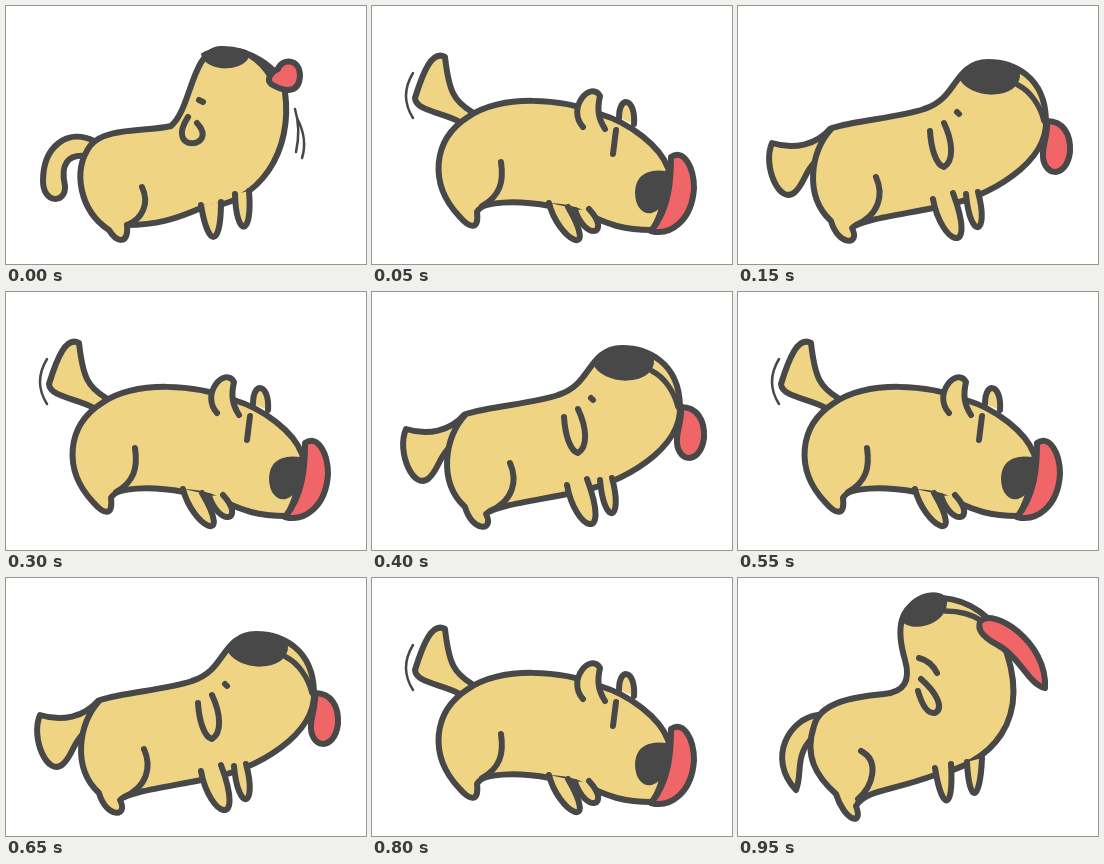
These frames come from a looping animation (360 by 258 pixels, 1000 ms). An HTML page with a canvas:

```html
<!DOCTYPE html>
<html lang="en">
<head>
<meta charset="utf-8">
<title>Wagging dog</title>
<style>
  html, body { margin: 0; width: 100%; height: 100%; overflow: hidden; background: #fff; }
  canvas { display: block; }
</style>
</head>
<body>
<canvas id="stage" width="360" height="258"></canvas>
<script>
const ctx = document.getElementById('stage').getContext('2d');
const STEP = 50;
const INK = '#484848', FUR = '#efd583', RED = '#f06668';

// Parts from back to front: name, fill, line width.
const parts = [
  ['tail', FUR, 6], ['farEar', FUR, 6], ['body', FUR, 6],
  ['farLeg', FUR, 6], ['nearLeg', FUR, 6], ['hind', null, 6],
  ['ear', FUR, 6], ['eye', null, 6], ['nose', INK, 2],
  ['mouth', null, 5.5], ['tongue', RED, 6], ['swish', null, 2.5]
];

// Body order: back, rump, foot, belly, chest, muzzle, nape.
const up = {
  tail: 'M88 135C62 122 37 140 37 175C37 198 60 198 59 180C54 158 62 148 80 150',
  body: `M165 120C140 126 98 121 84 140C66 165 74 205 103 224C110 236 123 240 121 219
    C150 219 170 213 195 202C255 198 287 145 279 86C274 60 240 42 215 43C185 44 186 102 165 120Z`,
  farLeg: 'M229 188C230 232 247 232 243 185',
  nearLeg: 'M195 199C202 242 215 242 215 196',
  hind: 'M136 181C144 198 136 213 121 219',
  ear: 'M182 111C158 148 214 142 191 117',
  eye: 'M193 94L197 96',
  nose: 'M196 48C205 41 236 41 243 47C241 66 200 66 196 48Z',
  mouth: 'M243 49C251 54 260 62 265 72',
  tongue: 'M272 63C276 52 294 52 294 70C293 88 278 86 265 78C260 73 265 66 272 63Z',
  swish: 'M289 103Q295 123 290 146M291 112Q302 133 296 152'
};

const down = {
  tail: 'M100 106C82 95 77 86 73 51C60 44 51 66 43 92C44 105 70 106 88 116',
  farEar: 'M247 112C247 88 264 92 262 118',
  body: `M228 108C190 92 130 88 96 111C60 134 57 178 87 210C100 225 107 222 105 206
    C110 195 145 194 178 200C222 202 225 224 280 224C299 212 303 180 296 162C288 140 258 117 228 108Z`,
  farLeg: 'M203 204C214 236 240 228 217 203',
  nearLeg: 'M177 197C186 234 228 256 196 201',
  hind: 'M129 156C132 176 128 190 110 200',
  ear: 'M211 121C194 102 219 74 228 90C225 103 226 112 233 123',
  eye: 'M244 124L241 148',
  nose: 'M264 186C265 164 285 164 297 167C296 215 264 216 264 186Z',
  mouth: 'M296 166C298 180 290 205 281 224',
  tongue: 'M299 151C312 142 322 162 322 182C320 215 298 230 279 225C297 203 299 175 299 151Z',
  swish: 'M41 67Q27 90 41 112'
};

const level = {
  tail: 'M92 123C78 139 56 144 34 137C24 160 42 200 57 186C66 178 66 168 76 157',
  body: `M186 103C160 112 118 114 94 122C72 146 66 190 93 215C100 240 123 240 114 222
    C122 214 160 209 195 202C255 192 310 155 308 114C307 70 275 56 250 56C215 57 220 93 186 103Z`,
  farLeg: 'M228 188C232 235 252 230 240 186',
  nearLeg: 'M195 193C203 238 240 254 215 187',
  hind: 'M138 171C146 189 141 209 118 219',
  ear: 'M192 125C193 142 198 159 206 161C216 155 215 136 206 117',
  eye: 'M219 106L221 108',
  nose: 'M221 70C236 52 272 52 281 67C283 94 230 94 221 70Z',
  mouth: 'M280 79C292 85 302 99 306 115',
  tongue: 'M309 115C325 115 333 128 332 146C328 175 303 170 305 146C306 136 310 126 309 115Z'
};

const thrownBack = {
  tail: 'M80 137C52 140 28 180 58 212C65 195 56 178 75 159',
  body: `M146 116C115 119 82 124 76 148C66 178 78 198 98 216C106 242 126 250 118 228
    C128 212 150 214 197 197C250 186 298 145 264 62C256 40 232 22 204 20
    C154 18 160 58 167 82C173 103 166 114 146 116Z`,
  farLeg: 'M229 184C231 226 242 226 244 180',
  nearLeg: 'M197 190C204 234 216 234 213 186',
  hind: 'M123 173C142 183 135 208 120 221',
  ear: 'M180 113C184 127 189 136 197 135C206 130 199 115 183 101',
  eye: 'M181 80Q193 83 199 95',
  nose: 'M164 42C169 12 211 8 208 26C206 47 172 54 164 42Z',
  mouth: 'M207 33C222 33 235 37 244 43',
  tongue: 'M242 44C254 28 310 64 307 110C290 106 282 78 258 66C247 60 239 52 242 44Z'
};

// Blends the parts that both poses share.
function mix(from, to, t) {
  const pose = {};
  for (const name in to) {
    const goal = to[name].match(/\d+/g);
    let i = 0;
    pose[name] = from[name].replace(/\d+/g, n => +n + (goal[i++] - n) * t);
  }
  return pose;
}

const cycle = [up, down, mix(down, level, 0.6), level, thrownBack];

ctx.strokeStyle = INK;
ctx.lineCap = ctx.lineJoin = 'round';

function draw(time) {
  const pose = cycle[Math.floor(time / STEP) % cycle.length];
  ctx.clearRect(0, 0, 360, 258);
  for (const [name, fill, width] of parts) {
    if (!pose[name]) continue;
    const path = new Path2D(pose[name]);
    if (fill) {
      ctx.fillStyle = fill;
      ctx.fill(path);
    }
    ctx.lineWidth = width;
    ctx.stroke(path);
  }
}

const start = performance.now();
function tick() {
  draw(performance.now() - start);
  requestAnimationFrame(tick);
}
tick();
</script>
</body>
</html>
```
